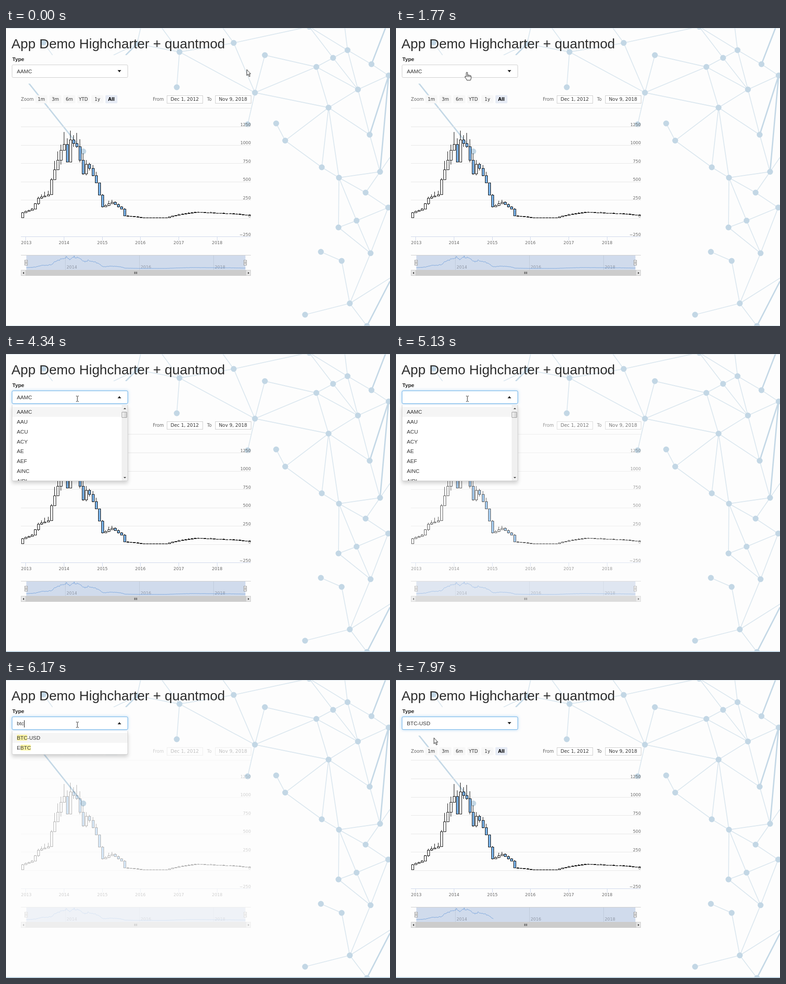
An HTML page that plays this animation: 850x659 px, repeating every 8000 ms.

```html
<!DOCTYPE html>
<html lang="en">
<head>
<meta charset="utf-8">
<title>App Demo</title>
<style>
html, body { margin: 0; width: 100%; height: 100%; overflow: hidden; background: #fdfdfd; }
body { position: relative; font: 11.67px "Liberation Sans", Arial, sans-serif; color: #333; }
svg { position: absolute; left: 0; top: 0; }
h1 { position: absolute; left: 12px; top: 17px; margin: 0; font: 30px/36px "Liberation Sans", Arial, sans-serif; white-space: nowrap; color: #2d2d2d; }
label { position: absolute; left: 14px; top: 61px; font-weight: bold; line-height: 16px; color: #222; }
.box { position: absolute; left: 13px; top: 81px; width: 257px; height: 29px; box-sizing: border-box; border: 1px solid #ccc; border-radius: 3px; background: #fff; }
.focus { border-color: #66afe9; box-shadow: 0 0 6px rgba(102,175,233,.55); }
.value { position: absolute; left: 24px; top: 81px; line-height: 29px; white-space: nowrap; }
.caret { display: inline-block; width: 1px; height: 16px; margin-right: -1px; background: #000; vertical-align: middle; }
.arrow { position: absolute; left: 247px; top: 93px; border: solid transparent; border-width: 0 4.5px; }
.down { border-top: 5px solid #222; }
.up { border-bottom: 5px solid #222; }
.drop { position: absolute; left: 13px; top: 113px; width: 257px; height: 168px; box-sizing: border-box; overflow: hidden; border: 1px solid #d0d0d0; border-top: 0; border-radius: 0 0 3px 3px; background: #fff; box-shadow: 0 5px 9px rgba(0,0,0,.175); }
.short { height: 52px; }
.list { position: absolute; left: 0; right: 0; top: 4px; }
.list div { height: 21.85px; line-height: 21.85px; padding-left: 10px; }
.list div:first-child { background: #f5f5f5; }
mark { color: inherit; background: rgba(255,237,40,.4); border-radius: 1px; }
.bar { position: absolute; right: 0; top: 0; width: 13px; height: 168px; background: #f0f0f0; }
.bar::before, .bar::after { content: ""; position: absolute; left: 4px; border: solid transparent; border-width: 0 3px; }
.bar::before { top: 6px; border-bottom: 3px solid #444; }
.bar::after { bottom: 6px; border-top: 3px solid #444; }
.thumb { position: absolute; right: 1px; top: 15px; width: 10px; height: 11px; border: 1px solid #999; border-radius: 1px; background: linear-gradient(90deg, #f4f4f4, #cfcfcf); }
.tall { height: 48px; }
.chart { font: 9.17px "DejaVu Sans", sans-serif; fill: #666; animation: fade 8s infinite; }
.ui { font-size: 10px; fill: #333; }
.trace { fill: none; stroke: #78a4dc; animation: trace 8s infinite; }
.cursor { animation: move 8s linear infinite; }
@keyframes fade {
  0%, 63.25% { opacity: 1; }
  66.375% { opacity: .3; animation-timing-function: step-end; }
  96.5%, 100% { opacity: 1; }
}
@keyframes trace {
  0% { clip-path: inset(-2px -2px -2px -2px); animation-timing-function: step-end; }
  96.5% { clip-path: inset(-2px 100% -2px -2px); animation-timing-function: ease-in; }
  99.625% { clip-path: inset(-2px 65% -2px -2px); animation-timing-function: linear; }
  100% { clip-path: inset(-2px 60% -2px -2px); }
}
@keyframes move {
  0%, .75% { transform: translate(532.5px, 91.5px); }
  8% { transform: translate(385.5px, 103.5px); }
  10.625%, 11.75% { transform: translate(318px, 106px); }
  14% { transform: translate(276px, 108px); }
  21.375% { transform: translate(160px, 99px); }
  22.125%, 82% { transform: translate(158px, 98.5px); }
  83.25%, 85.25% { transform: translate(142px, 108px); }
  92.125%, 95.62% { transform: translate(85px, 127.5px); }
  95.63%, 100% { transform: translate(83.5px, 127.5px); }
}
</style>
</head>
<body>
<svg id="back" width="850" height="659" fill="none"></svg>
<svg id="plot" class="chart" width="850" height="659"></svg>
<h1>App Demo Highcharter + quantmod</h1>
<label>Type</label>
<div id="controls"></div>
<svg width="850" height="659" stroke="#111">
  <g class="cursor">
    <path id="pointer" fill="#fff" d="M.5.5V13.5L3.4 10.7 5.7 16 7.8 15 5.5 10H9.2Z"/>
    <g id="hand" transform="translate(-1 -1)"><path fill="#fff" d="M-1.5 10.5V2Q-1.5.5 0 .5T1.5 2V7Q3 5.5 4.2 7.2 6 6 7 8 9.3 7.3 9.3 9.5V12.5Q9.3 15 7.8 18H0Q-1 15-4.5 11.2-5 8.3-1.5 10.5Z"/><path fill="none" d="M1.5 7v4M4.2 7.5v3.5M7 8.3V11"/></g>
    <path id="beam" fill="none" d="M-3-5.5H-1L0-4.5 1-5.5H3M0-4.5V5.5M-3 6.5H-1L0 5.5 1 6.5H3"/>
  </g>
</svg>
<script>
const LOOP = 8000, OPEN = 2760, PICK = 7650;
const MONTHS = 72, ZERO = 421;
const $ = id => document.getElementById(id);
const sheet = document.head.appendChild(document.createElement('style'));
let windows = 0;

// Shows an element only inside the given [from, to] spans of the loop.
function during(el, ...spans) {
  const name = 'window' + windows++;
  const at = (ms, state) => `${ms / LOOP * 100}%{visibility:${state}}`;
  const steps = spans.map(([from, to]) => at(from, 'visible') + at(to, 'hidden')).join('');
  const start = spans[0][0] ? at(0, 'hidden') : '';
  sheet.append(`@keyframes ${name}{${start}${steps}}`);
  el.style.animation = `${name} ${LOOP}ms step-end infinite`;
  return el;
}

function div(parent, className, html = '') {
  const el = document.createElement('div');
  el.className = className;
  el.innerHTML = html;
  return parent.appendChild(el);
}

const times = (count, draw) => Array.from({ length: count }, (_, i) => draw(i)).join('');
const line = (x1, y1, x2, y2, color, width = 1) =>
  `<path d="M${x1} ${y1}L${x2} ${y2}" stroke="${color}" stroke-width="${width}"/>`;
const rect = (x, y, w, h, fill, stroke = 'none', rx = 0) =>
  `<rect x="${x}" y="${y}" width="${w}" height="${h}" rx="${rx}" fill="${fill}" stroke="${stroke}"/>`;
const text = (x, y, value, anchor = 'middle', extra = '') =>
  `<text x="${x}" y="${y}" text-anchor="${anchor}" ${extra}>${value}</text>`;

// Repeatable pseudo-random value in 0..1.
function noise(seed) {
  const s = Math.sin(seed * 12.9898) * 43758.5453;
  return s - Math.floor(s);
}

function drawNetwork() {
  const nodes = {
    A: [83, 32], B: [290, 35], C: [384, 53], D: [504, 33], E: [378, 131], F: [551, 143], G: [535, 213],
    H: [573, 60], I: [687, 86], J: [724, 66], K: [756, 49], L: [809, 80], M: [847, 105], N: [779, 136],
    O: [714, 176], P: [805, 236], Q: [828, 318], R: [598, 211], S: [618, 249], T: [699, 308],
    U: [737, 331], V: [796, 364], W: [846, 397], X: [776, 426], Y: [736, 441], Z: [807, 498],
    a: [697, 495], b: [743, 515], c: [761, 609], d: [662, 634], e: [799, 659], f: [171, 273], g: [671, -3]
  };
  const wire = route => 'M' + [...route].map(key => nodes[key]).join('L');
  const toEdge = (key, x, y) => `M${nodes[key]}L${x} ${y}`;
  const thin = 'BCDFCE GFHIFOIJKINJgKNMLK Dg NOPN OSR STOUT UQP QVUYXU VWZY WXZcba dce'
    .split(' ').map(wire).join('') +
    toEdge('D', 480, 0) + toEdge('C', 345, 0) + toEdge('K', 750, 0) + toEdge('Q', 850, 286) +
    toEdge('c', 850, 553) + toEdge('B', 238, 60) + toEdge('B', 298, 0) + toEdge('A', 103, 60);
  const thick = wire('PMQ') + toEdge('L', 840, 0) + toEdge('e', 850, 560) +
    toEdge('B', 265, 60) + toEdge('f', 40, 109);
  $('back').innerHTML =
    `<path d="${thin}" stroke="#dbe7ef" stroke-width="1.8"/>` +
    `<path d="${thick}" stroke="#c4d8e6" stroke-width="3"/>` +
    Object.values(nodes).map(([x, y]) => `<circle cx="${x}" cy="${y}" r="6.5" fill="#c3d7e5"/>`).join('') +
    rect(0, 60, 283, 63, '#fdfdfd') +
    line(0, .5, 850, .5, '#d5e1e9') + line(0, 658.5, 850, 658.5, '#d0e0eb') +
    '<path id="edge" d="M0 658H850" stroke="#bed4e3" stroke-width="2"/>';
  during($('edge'), [OPEN, LOOP]);
}

// Turning points of the closing price: month, height on the stage.
const turns = [
  [-1, 419], [0, 408], [3, 400], [5, 376], [8, 368], [9, 335], [12, 270], [13, 257], [14, 296],
  [15, 247], [17, 262], [19, 322], [20, 301], [21, 310], [23, 342], [25, 395], [28, 385],
  [31, 400], [32, 415], [37, 418.5], [45, 418.5], [49, 412], [54, 406.5], [66, 410.5], [71, 414]
];

function closeAt(month) {
  const last = turns.length - 1;
  const found = turns.findIndex(([m]) => m >= month);
  const k = found < 0 ? last : Math.max(1, found);
  const [m0, y0] = turns[k - 1], [m1, y1] = turns[k];
  return y0 + (y1 - y0) * Math.min(1, (month - m0) / (m1 - m0));
}

function drawCandle(i) {
  const open = Math.round(closeAt(i - 1)), close = Math.round(closeAt(i));
  const top = Math.min(open, close), bottom = Math.max(open, close);
  const x = Math.round(36 + i * 7.07) + .5;
  const reach = ZERO - top;
  const high = Math.round(top - reach * .18 * noise(i + 3));
  const low = Math.round(bottom + reach * .08 * noise(i + 50));
  return line(x, high, x, top, '#000') + line(x, bottom, x, low, '#000') +
    rect(x - 2, top + .5, 5, Math.max(bottom - top, .3), close > open ? '#7cb5ec' : '#fff', '#000');
}

function tracePoint(i) {
  const month = i / 4, height = (ZERO - closeAt(month)) * .155;
  const y = 532 - height * (1 + .22 * (noise(i) - .5));
  return `${(45 + month * 6.83).toFixed(1)} ${y.toFixed(1)} `;
}

function drawRange() {
  const buttons = ['1m', '3m', '6m', 'YTD', '1y', 'All'].map((name, i) => {
    const x = 65 + i * 31, chosen = name === 'All';
    return rect(x, 148.5, 26.5, 18, chosen ? '#e6ebf5' : '#f7f7f7', 'none', 2) +
      text(x + 13.2, 160.5, name, 'middle', chosen ? 'font-weight="bold" fill="#000"' : '');
  });
  const dates = ['Dec 1, 2012', 'Nov 9, 2018'].map((date, i) => {
    const x = 356 + i * 107;
    return rect(x + .5, 149.5, 79, 17, '#fff', '#ccc') + text(x + 39.5, 160.5, date, 'middle', 'font-size="10.3"');
  });
  const small = 'font-size="9.8"';
  return text(33, 160.5, 'Zoom', 'start', small) + text(325, 160.5, 'From', 'start', small) +
    text(445, 160.5, 'To', 'start', small) + `<g class="ui">${buttons.join('')}${dates.join('')}</g>`;
}

function drawPrices() {
  const grid = times(7, i => {
    const y = Math.floor(177.9 + i * 40.57) + .5;
    return line(33, y, 542, y, '#e6e6e6');
  });
  const years = times(6, i => {
    const x = Math.round(43 + i * 84.8) + .5;
    return line(x, 462, x, 470, '#ccd6eb') + text(i ? x : 45, 478, 2013 + i);
  });
  const levels = times(7, i =>
    text(542, 216.5 + i * 40.5, String(1250 - i * 250).replace('-', '−'), 'end'));
  return grid + line(33, 461.5, 542, 461.5, '#ccd6eb') + years + times(MONTHS, drawCandle) + levels;
}

function drawNavigator() {
  const years = times(3, i => {
    const x = 131 + i * 164;
    return line(x + .5, 503, x + .5, 535, '#bfc9d9') + text(x + 3, 532, 2014 + i * 2, 'start', 'fill="#8e96a4"');
  });
  const handles = times(2, i => {
    const x = 41.5 + i * 485;
    return rect(x, 513.5, 6, 11, '#f2f2f2', '#999') + line(x + 2, 516, x + 2, 522, '#999') +
      line(x + 4, 516, x + 4, 522, '#999');
  });
  const ends = times(2, i => rect(33.5 + i * 498, 535.5, 10, 12, '#e6e6e6', '#ccc'));
  const grip = times(3, i => line(284.5 + i * 2.5, 539, 284.5 + i * 2.5, 544, '#333'));
  return line(33, 502.5, 542, 502.5, '#ccc') + rect(45, 503, 485, 32, '#d0dbec') + years +
    `<path class="trace" d="M${times(MONTHS * 4 - 3, tracePoint)}"/>` + handles +
    rect(33.5, 535.5, 508, 12, '#ccc', '#ccc') + ends + grip +
    '<path fill="#333" d="M37 541.8l3-2.5v5zM538.5 541.8l-3-2.5v5z"/>';
}

function addList(parent, names, query, span) {
  const mark = name => query ? name.replace(RegExp(query, 'i'), '<mark>$&</mark>') : name;
  const rows = names.split(' ').map(name => `<div>${mark(name)}</div>`);
  during(div(parent, 'list', rows.join('')), span);
}

function addValue(value, span, ...blinks) {
  const el = during(div($('controls'), 'value', value), span);
  if (!blinks.length) return;
  const caret = el.appendChild(document.createElement('span'));
  caret.className = 'caret';
  during(caret, ...blinks);
}

function drawControls() {
  const root = $('controls');
  div(root, 'box');
  during(div(root, 'box focus'), [OPEN, LOOP]);
  during(div(root, 'arrow down'), [0, OPEN], [PICK, LOOP]);
  during(div(root, 'arrow up'), [OPEN, PICK]);

  addValue('AAMC', [0, 4560], [OPEN, 3310], [3840, 4340]);
  addValue('', [4560, 5270], [4560, 5090]);
  addValue('b', [5270, 5490], [5270, 5490]);
  addValue('bt', [5490, 5990], [5490, 5990]);
  addValue('btc', [5990, PICK], [5990, 6600], [7130, PICK]);
  addValue('BTC-USD', [PICK, LOOP]);

  const long = during(div(root, 'drop'), [OPEN, 6170]);
  addList(long, 'AAMC AAU ACU ACY AE AEF AINC AIRI', '', [OPEN, 5490]);
  addList(long, 'B BL BA BB BC BE BG BH', 'b', [5490, 5640]);
  addList(long, 'BT BTA BTE BTI BTN BTO BTX BTZ', 'bt', [5640, 6170]);
  const bar = div(long, 'bar');
  during(div(bar, 'thumb'), [OPEN, 5640]);
  during(div(bar, 'thumb tall'), [5640, 6170]);

  const short = during(div(root, 'drop short'), [6170, PICK]);
  addList(short, 'BTC-USD EBTC', 'btc', [6170, PICK]);
}

drawNetwork();
$('plot').innerHTML = drawRange() + drawPrices() + drawNavigator();
drawControls();
during($('pointer'), [0, 1175], [PICK, LOOP]);
during($('hand'), [1175, 2880], [6880, PICK]);
during($('beam'), [2880, 6880]);
</script>
</body>
</html>
```
